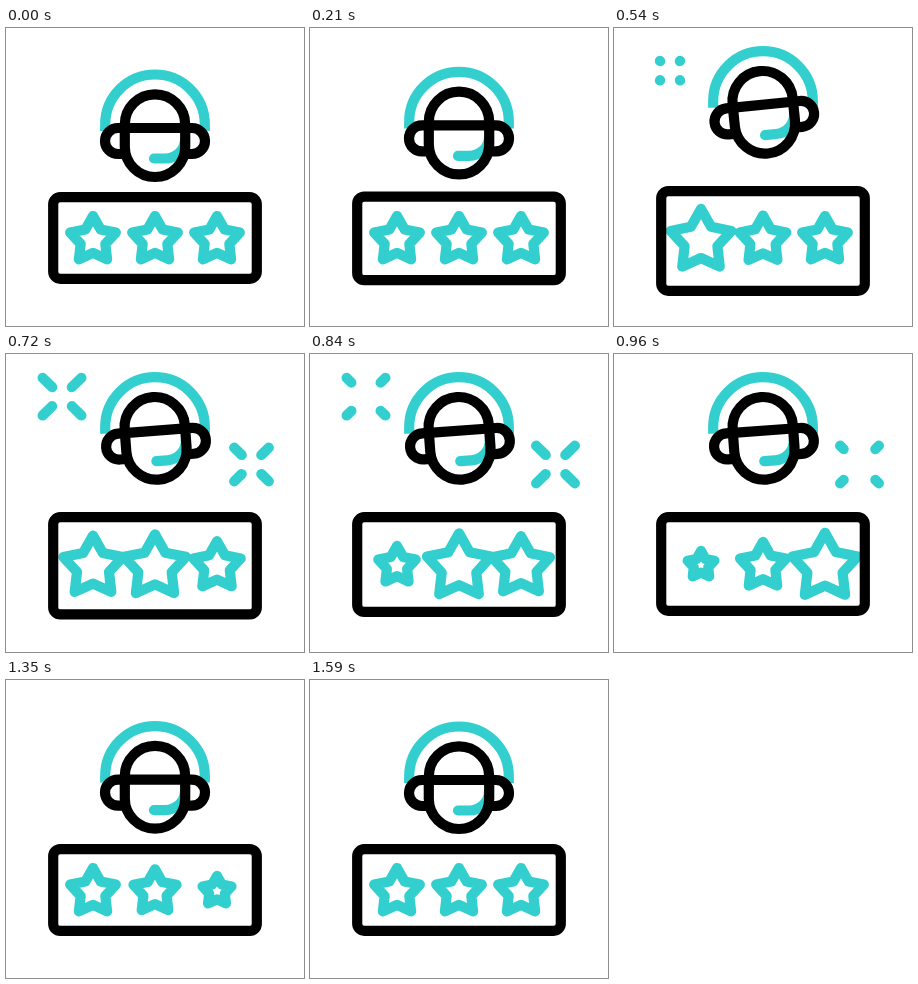
An HTML page for the animation above (1830 ms loop, 298 by 298 pixels).

```html
<!DOCTYPE html>
<html lang="en">
<head>
<meta charset="utf-8">
<title>Support rating</title>
<style>
  html, body { margin: 0; width: 100%; height: 100%; overflow: hidden; background: #fff; }
  svg { display: block; width: 100%; height: 100%; }
  path, rect { fill: none; stroke: #000; stroke-width: 10.2; stroke-linejoin: round; stroke-linecap: round; }
  .teal { stroke: #33cfcf; }
  #band { stroke-linecap: butt; }
</style>
</head>
<body>
<svg viewBox="0 0 298 298">
  <g id="agent">
    <path id="band" class="teal" d="M99.2 103V96.3a49.8 49.8 0 0 1 99.6 0V103"/>
    <g id="face">
      <path class="teal" d="M148 130.5H159a20 19 0 0 0 20-19"/>
      <rect x="118.8" y="66.3" width="60.4" height="82.7" rx="30.2"/>
      <path d="M118.8 126H112a13 13 0 0 1 0-26H186a13 13 0 0 1 0 26H179.2"/>
    </g>
  </g>
  <g id="stars"></g>
  <rect id="panel" x="47.2" width="203.6" rx="7"/>
  <g id="sparks"></g>
</svg>
<script>
const LOOP = 1830, STEP = 30;
const BEAT = 310;            // length of each grow / shrink / settle phase of a star
const $ = id => document.getElementById(id);

// Eased 0 to 1 between times a and b
function ramp(t, a, b) {
  const p = Math.min(1, Math.max(0, (t - a) / (b - a)));
  return (1 - Math.cos(Math.PI * p)) / 2;
}

function addPath(parent) {
  const p = document.createElementNS("http://www.w3.org/2000/svg", "path");
  p.setAttribute("class", "teal");
  parent.appendChild(p);
  return p;
}

const stars = [0, 1, 2].map(i => ({ x: 87 + 62 * i, start: 330 + 165 * i, el: addPath($("stars")) }));

function makeBurst(x, y, start) {
  const rays = [];
  for (const sx of [-1, 1])
    for (const sy of [-1, 1]) rays.push({ sx, sy, el: addPath($("sparks")) });
  return { x, y, start, rays };
}
const bursts = [makeBurst(56, 42.7, 525), makeBurst(245.5, 110.5, 630)];

function starPath(x, y, r) {
  let d = "";
  for (let i = 0; i < 10; i++) {
    const a = i * Math.PI / 5, q = i % 2 ? r * 0.54 : r;
    d += (i ? "L" : "M") + (x + q * Math.sin(a)).toFixed(2) + " " + (y - q * Math.cos(a)).toFixed(2);
  }
  return d + "Z";
}

function drawStar({ x, start, el }, t) {
  const phase = n => ramp(t, start + n * BEAT, start + (n + 1) * BEAT);
  const r = 24 + 10.3 * phase(0) - 20.3 * phase(1) + 10 * phase(2);
  el.setAttribute("d", starPath(x, 212 + (r - 24) * 0.1, r));
}

function drawBurst({ x, y, start, rays }, t) {
  const end = start + 405;
  const head = 9.8 + 9.6 * ramp(t, start, start + 130);
  const tail = 9.8 + 9.6 * ramp(t, start + 225, end);
  for (const { sx, sy, el } of rays) {
    const at = k => (x + sx * k) + " " + (y + sy * k * 0.97);
    el.setAttribute("d", `M${at(tail)}L${at(head)}`);
    el.style.display = t >= start && t < end ? "" : "none";
  }
}

function render(t) {
  const up = ramp(t, 160, 390);
  const lift = up - ramp(t, 1020, 1380);
  const tilt = -5.8 * ramp(t, 390, 540) + 1.6 * ramp(t, 540, 780) + 4.2 * ramp(t, 960, 1140);
  $("agent").setAttribute("transform", `translate(0 ${-23.3 * lift})`);
  $("face").setAttribute("transform", `rotate(${tilt} 149 100)`);

  const top = 169.2 - 6 * lift;
  const bottom = 250.8 + 6 * lift + 6 * (up - ramp(t, 540, 960));
  $("panel").setAttribute("y", top);
  $("panel").setAttribute("height", bottom - top);

  for (const s of stars) drawStar(s, t);
  for (const b of bursts) drawBurst(b, t);
}

const began = performance.now();
function tick() {
  const t = (performance.now() - began) % LOOP;
  render(Math.floor(t / STEP) * STEP);
  requestAnimationFrame(tick);
}
tick();
</script>
</body>
</html>
```
